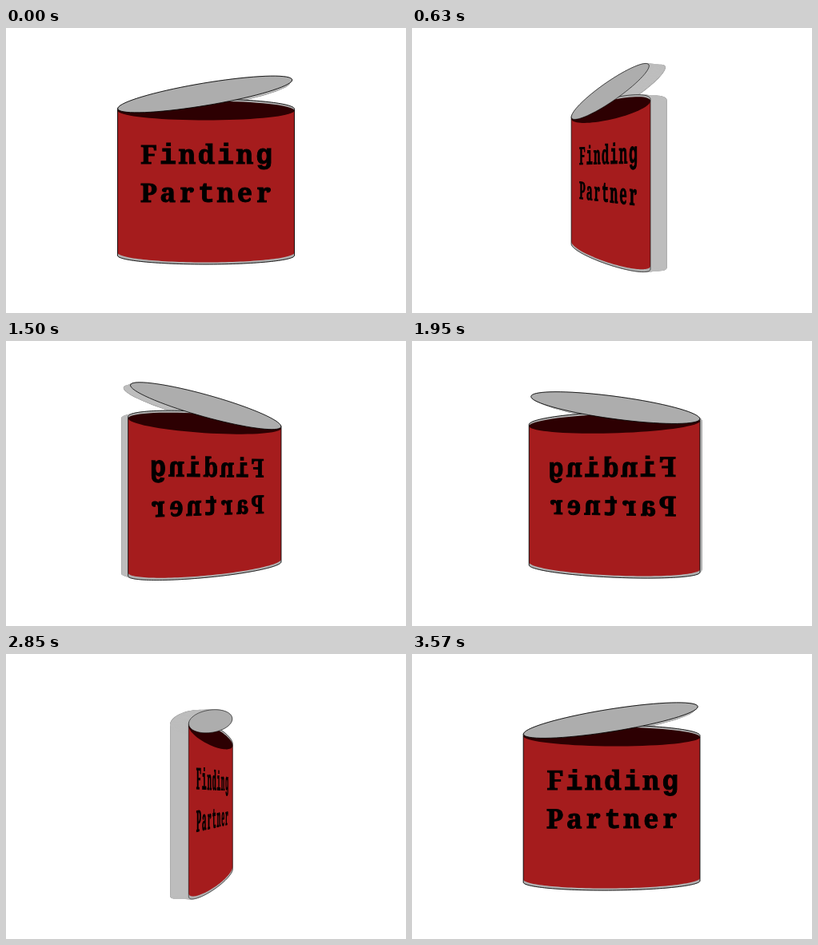
Recreate the animation shown at these times as an HTML page with a canvas. Size 500 px wide and 357 px high, loop 3.6 s.

```html
<!DOCTYPE html>
<html lang="en">
<head>
<meta charset="utf-8">
<title>Spinning can</title>
<style>
  html, body { margin: 0; width: 100%; height: 100%; overflow: hidden; background: #fff; }
  canvas { display: block; width: 500px; height: 357px; }
</style>
</head>
<body>
<canvas id="can" width="500" height="357" role="img" aria-label="Finding Partner"></canvas>
<script>
const LOOP = 3600, STEP = 30;
const EYE = 668, HALF = 10, CX = 250.6, CY = 178.5;
const FIT = (EYE - HALF) / EYE; // keeps the front view at drawn size
const PI = Math.PI;
const ctx = document.getElementById('can').getContext('2d');

function arc(cx, cy, rx, ry, from, to, tilt = 0) {
  const n = 72, c = Math.cos(tilt), s = Math.sin(tilt);
  return Array.from({ length: n + 1 }, (_, i) => {
    const a = from + (to - from) * i / n;
    const x = rx * Math.cos(a), y = ry * Math.sin(a);
    return [cx + x * c - y * s, cy + x * s + y * c];
  });
}

const body = [
  ...arc(250, 101.5, 110.5, 12.5, PI, 2 * PI),
  ...arc(250, 285, 110.5, 11, 0, PI)
];
const label = [[139.5, 103.5], [360.5, 103.5], ...arc(250, 281.5, 110.5, 12, 0, PI)];
const inside = arc(250, 103.5, 110.5, 12, 0, 2 * PI);
const lid = arc(248.7, 83, 110.5, 14, 0, 2 * PI, -9.5 * PI / 180);

let cos, sin;

function project([px, py], z) {
  const x = (px - CX) * FIT, y = (py - CY) * FIT;
  const k = EYE / (EYE - x * sin - z * cos);
  return [CX + (x * cos - z * sin) * k, CY + y * k];
}

function trace(points) {
  ctx.beginPath();
  points.forEach(p => ctx.lineTo(...p));
  ctx.closePath();
}

function paint(shape, z, fill, line, width) {
  trace(shape.map(p => project(p, z)));
  if (fill) {
    ctx.fillStyle = fill;
    ctx.fill();
  }
  if (line) {
    ctx.strokeStyle = line;
    ctx.lineWidth = width;
    ctx.stroke();
  }
}

function drawWalls(shape, z) {
  const front = shape.map(p => project(p, z));
  const back = shape.map(p => project(p, -z));
  ctx.fillStyle = ctx.strokeStyle = '#bdbdbd';
  ctx.lineWidth = 0.8;
  front.forEach((p, i) => {
    const j = (i + 1) % front.length;
    trace([p, front[j], back[j], back[i]]);
    ctx.fill();
    ctx.stroke();
  });
}

function drawWord(word, y, z) {
  ctx.fillStyle = ctx.strokeStyle = '#000';
  ctx.lineWidth = 1;
  ctx.textAlign = 'center';
  [...word].forEach((ch, i) => {
    const x = 178.5 + 24 * i;
    const [ox, oy] = project([x, y], z);
    const [rx, ry] = project([x + 1, y], z);
    const [dx, dy] = project([x, y + 1], z);
    ctx.save();
    ctx.transform(rx - ox, ry - oy, dx - ox, dy - oy, ox, oy);
    ctx.font = 'igt'.includes(ch)
      ? 'bold 35px "Liberation Mono", monospace'
      : 'bold 33px "Noto Serif", serif';
    ctx.fillText(ch, 0, 0);
    ctx.strokeText(ch, 0, 0);
    ctx.restore();
  });
}

function drawFace(z) {
  const width = 0.45 + 0.4 * Math.abs(cos);
  paint(body, z, '#b0b0b0');
  paint(label, z, '#a51c1d');
  paint(inside, z, '#2d0002');
  paint(body, z, null, '#000', width);
  paint(lid, z, '#adadad', '#000', width);
  drawWord('Finding', 170, z);
  drawWord('Partner', 218, z);
}

function draw(time) {
  const angle = Math.floor(time % LOOP / STEP) * STEP / LOOP * 2 * PI;
  cos = Math.cos(angle);
  sin = Math.sin(angle);
  const z = cos > 0 ? HALF : -HALF;
  ctx.clearRect(0, 0, 500, 357);
  for (const shape of [body, lid]) paint(shape, -z, null, '#777', 1.4);
  for (const shape of [body, lid]) drawWalls(shape, z);
  // edge-on, neither face can be seen
  if (Math.abs(cos) * EYE > HALF) drawFace(z);
}

function tick() {
  draw(performance.now());
  requestAnimationFrame(tick);
}
tick();
</script>
</body>
</html>
```
